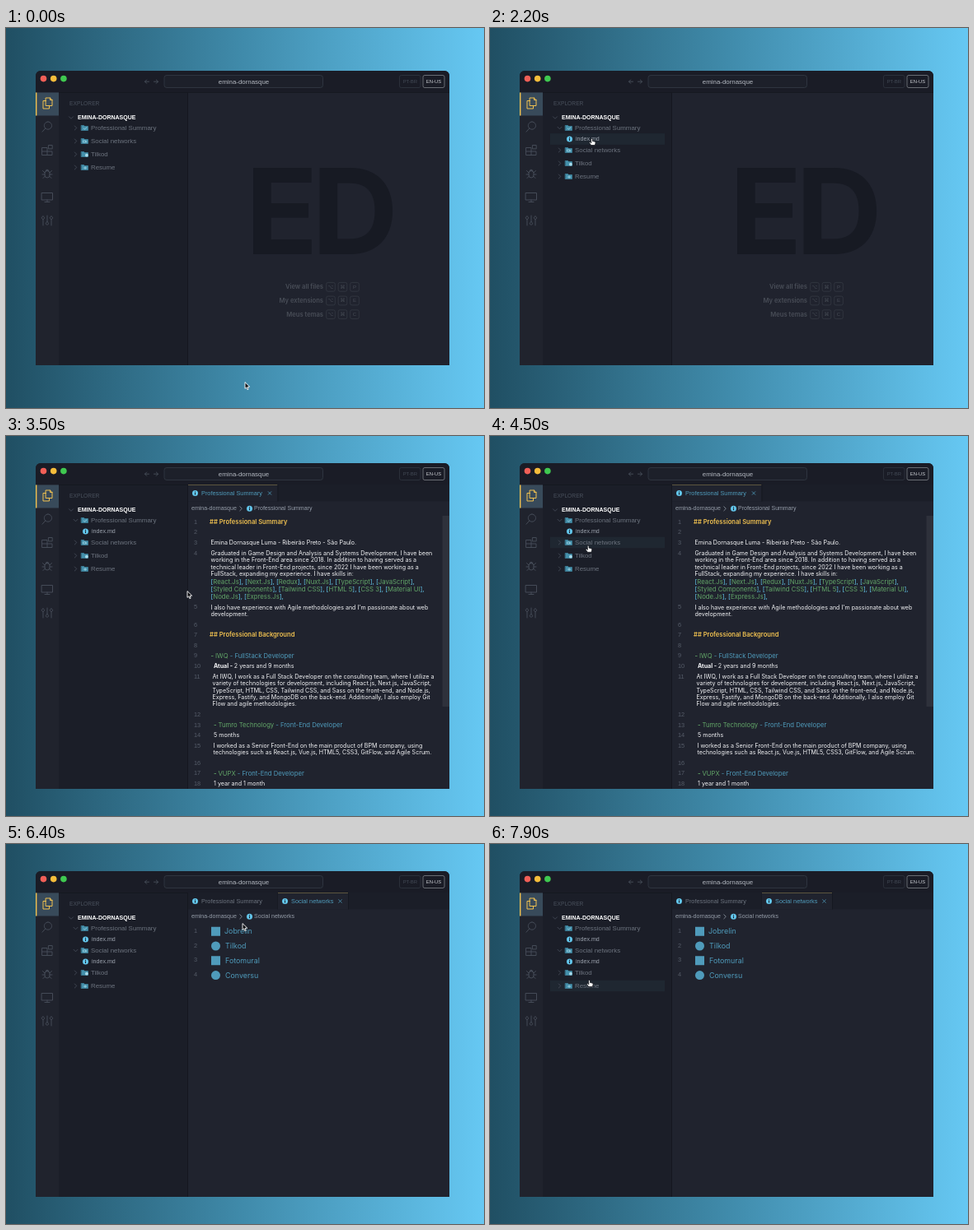
An HTML page with a canvas that plays this animation: 580 by 462 pixels, repeating every 8 s.

```html
<!DOCTYPE html>
<html lang="en">
<head>
<meta charset="utf-8">
<title>Code editor portfolio</title>
<style>
  html, body { margin: 0; width: 100%; height: 100%; overflow: hidden; background: #3f8cac; }
  canvas { display: block; width: 580px; height: 462px; }
</style>
</head>
<body>
<canvas id="stage"></canvas>
<script>
const W = 580, H = 462, LOOP = 8000, STEP = 100;
const canvas = document.getElementById('stage');
const ctx = canvas.getContext('2d');
const dpr = window.devicePixelRatio || 1;
canvas.width = W * dpr;
canvas.height = H * dpr;

const SANS = '"Liberation Sans", Arial, sans-serif';
const INTER = 'Inter, "Liberation Sans", sans-serif';
const SYMBOL = '"DejaVu Sans", sans-serif';
const C = {
  title: '#1a1c26', activity: '#20232d', side: '#1b1e28', editor: '#20232e', line: '#15171f',
  yellow: '#efc050', green: '#62a668', blue: '#4f9bbb', cyan: '#62c5ea', folder: '#4490ab',
  white: '#f4f5f7', dim: '#49505c', label: '#6c737e', hover: '#1f2731', logo: '#171a23'
};
const USER = 'emina-dornasque';

// Moments at which the interface changes
const AT = { firstFolder: 1800, firstTab: 2500, firstText: 2600, secondFolder: 4800, secondTab: 5300, links: 5500 };

// Pointer tip: time, x, y
const PATH = [
  [0, 290, 431], [100, 195, 215], [200, 90, 56], [300, 90, 56], [500, 102, 40], [900, 133, 117],
  [1300, 133, 117], [1500, 132, 119], [1900, 132, 119], [2200, 123, 135], [3100, 123, 135],
  [3500, 220, 189], [3700, 284, 235], [4000, 117, 157], [4600, 119, 129], [4800, 119, 129],
  [5100, 112, 143], [5800, 112, 143], [6100, 334, 112], [6200, 330, 85], [6400, 287, 97],
  [6600, 298, 103], [6700, 298, 103], [7100, 292, 145], [7600, 160, 168], [7700, 148, 168],
  [7900, 120, 166], [LOOP, 120, 166]
];

function pointerAt(t) {
  const i = Math.max(1, PATH.findIndex(p => p[0] >= t));
  const [t0, x0, y0] = PATH[i - 1], [t1, x1, y1] = PATH[i];
  const k = (t - t0) / (t1 - t0);
  return { x: x0 + (x1 - x0) * k, y: y0 + (y1 - y0) * k };
}

function text(s, x, y, size, color, { weight = 400, font = SANS, align = 'left' } = {}) {
  ctx.font = `${weight} ${size}px ${font}`;
  ctx.textAlign = align;
  ctx.textBaseline = 'middle';
  ctx.fillStyle = color;
  ctx.fillText(s, x, y);
  return ctx.measureText(s).width;
}

function runs(parts, x, y, size) {
  for (const [s, color, weight] of parts) x += text(s, x, y, size, color, { weight, font: INTER });
}

function rect(x, y, w, h, color) {
  ctx.fillStyle = color;
  ctx.fillRect(x, y, w, h);
}

function box(x, y, w, h, r, stroke, fill) {
  ctx.beginPath();
  ctx.roundRect(x, y, w, h, r);
  if (fill) { ctx.fillStyle = fill; ctx.fill(); }
  if (stroke) { ctx.strokeStyle = stroke; ctx.lineWidth = 0.8; ctx.stroke(); }
}

function disc(x, y, r, color) {
  ctx.beginPath();
  ctx.arc(x, y, r, 0, 7);
  ctx.fillStyle = color;
  ctx.fill();
}

function path(d, x, y, stroke, width = 0.9, fill) {
  ctx.save();
  ctx.translate(x, y);
  const p = new Path2D(d);
  if (fill) { ctx.fillStyle = fill; ctx.fill(p); }
  ctx.strokeStyle = stroke;
  ctx.lineWidth = width;
  ctx.lineJoin = ctx.lineCap = 'round';
  ctx.stroke(p);
  ctx.restore();
}

function chevron(x, y, open, color = C.dim) {
  path(open ? 'M-2.5-1.2L0 1.3L2.5-1.2' : 'M-1.2-2.5L1.3 0L-1.2 2.5', x, y, color, 0.8);
}

function info(x, y) {
  disc(x, y, 3.5, C.cyan);
  rect(x - 0.5, y - 0.6, 1, 2.6, C.side);
  rect(x - 0.5, y - 2.1, 1, 1, C.side);
}

function background() {
  const g = ctx.createLinearGradient(0, 0, W, 0);
  g.addColorStop(0, '#204f63');
  g.addColorStop(0.5, '#408bab');
  g.addColorStop(1, '#66c8f3');
  rect(0, 0, W, H, g);
}

function titleBar() {
  rect(36, 0, 502, 26, C.title);
  ['#f25f57', '#f6bd3b', '#3fc950'].forEach((c, i) => disc(45.5 + i * 12.2, 9.6, 3.8, c));
  path('M2.5 0H-2.5M-.3-2.2L-2.5 0L-.3 2.2', 171, 13.2, C.dim);
  path('M-2.5 0H2.5M.3-2.2L2.5 0L.3 2.2', 182, 13.2, C.dim);
  box(192, 5.5, 192.5, 15, 3, '#343a46', '#1d202a');
  text(USER, 288.5, 13.7, 7.9, '#b4b9c1', { align: 'center' });
  box(477.5, 5.5, 25.5, 15, 2, '#303641');
  text('PT-BR', 490.3, 13.5, 5.9, '#444b57', { align: 'center' });
  box(506, 5.5, 26, 15, 2, '#7d8187');
  text('EN-US', 519, 13.5, 5.9, '#c9ccd1', { align: 'center' });
}

const TOOLS = [
  [68, 'M1-6a4.6 4.6 0 1 1-.1 0M-2.2 2L-6 6.2'],
  [96.5, 'M-6-3H0V6H-6ZM-6 1.5H6V6H0M0 1.5M1.8-6H6.2V-1.6H1.8Z'],
  [125, 'M0-3.5A3 3 0 0 1 3-.5V2A3 3 0 0 1-3 2V-.5A3 3 0 0 1 0-3.5ZM-1.8-3A1.8 1.8 0 0 1 1.8-3M-3 1H-6M3 1H6M-3-1L-5.5-3.5M3-1L5.5-3.5M-2.5 3L-5 5.5M2.5 3L5 5.5'],
  [153.5, 'M-6.5-5H6.5V3.5H-6.5ZM0 3.5V6M-3 6H3'],
  [182, 'M-5-1.5V6M0-6V1.5M5-1.5V6M-5-5a1.7 1.7 0 1 1-.1 0M0 1.8a1.7 1.7 0 1 1-.1 0M5-5a1.7 1.7 0 1 1-.1 0']
];

function activityBar(height) {
  rect(36, 26, 28, height - 26, C.activity);
  rect(36, 26.5, 28, 28, '#384a5a');
  rect(36, 26.5, 1.4, 28, C.yellow);
  path('M-2-6.5H3L5.5-4V3H-2ZM3-6.5V-4H5.5M-2-3H-5.5V6.5H2V3', 50.5, 39.5, C.yellow, 1);
  for (const [y, d] of TOOLS) path(d, 50, y, C.dim);
}

function folder(x, y, badge) {
  path('M-4-3H-1L0-2H4V3H-4Z', x, y, C.folder, 0.6, C.folder);
  const mark = '#a9dbea';
  if (badge === 0) path('M-1.2.6L0 1.6L2.4-.6', x, y, mark, 0.8);
  else if (badge === 1) path('M-1.5-.6H1V1.6H-1.5ZM2.2 0V1.6', x, y, mark, 0.7);
  else if (badge === 2) disc(x + 2.4, y + 1.2, 1.9, mark);
  else path('M-1 .6H2.2M.6-.8V2', x, y, mark, 0.8);
}

// Rows of the file tree, y measured from the window's top
function treeRows(t) {
  const open = [t >= AT.firstFolder, t >= AT.secondFolder];
  const rows = [];
  let y = 69.5;
  ['Professional Summary', 'Social networks', 'Tilkod', 'Resume'].forEach((name, i) => {
    rows.push({ name, y, open: open[i], badge: i });
    if (open[i]) rows.push({ name: 'index.md', y: y + 13.5, file: true });
    y += open[i] ? 27 : 16;
  });
  return rows;
}

function sidebar(height, rows, hovered) {
  rect(64, 26, 156, height - 26, C.side);
  text('EXPLORER', 77, 40.5, 6.7, C.dim);
  chevron(79, 57, true);
  text(USER.toUpperCase(), 87, 57, 7, '#ffffff', { weight: 700 });
  for (const row of rows) {
    if (row === hovered) rect(73, row.y - 6.8, 139, 13.6, C.hover);
    if (row.file) {
      info(96.5, row.y);
      text(row.name, 104, row.y + 0.3, 7.1, '#9aa1ac');
    } else {
      chevron(84.5, row.y, row.open);
      folder(95.5, row.y, row.badge);
      text(row.name, 103, row.y + 0.3, 7.9, C.label);
    }
  }
}

function welcome() {
  ctx.font = `700 145px ${INTER}`;
  ctx.textAlign = 'left';
  ctx.textBaseline = 'alphabetic';
  ctx.fillStyle = C.logo;
  for (const [ch, left] of [['E', 299.5], ['D', 380]]) {
    ctx.fillText(ch, left + ctx.measureText(ch).actualBoundingBoxLeft, 223);
  }
  const keys = [['View all files', 'P'], ['My extensions', 'E'], ['Meus temas', 'C']];
  keys.forEach(([label, key], i) => {
    const y = 262.8 + i * 16.7;
    text(label, 385, y + 0.4, 7.6, '#484d57', { weight: 600, font: INTER, align: 'right' });
    ['⌥', '⌘', key].forEach((k, j) => {
      const x = 394 + j * 14.5;
      box(x - 5.3, y - 5.4, 10.6, 10.8, 2, '#353a44');
      text(k, x, y + 0.3, 6, '#484d57', { font: j < 2 ? SYMBOL : SANS, align: 'center' });
    });
  });
}

function tab(x, w, label, active) {
  if (active) {
    rect(x, 26, w, 20.5, C.editor);
    rect(x, 26, w, 0.7, '#786c45');
    path('M-1.8-1.8L1.8 1.8M1.8-1.8L-1.8 1.8', x + w - 9.5, 36.5, C.blue, 0.8);
  }
  rect(x + w, 26, 0.8, 20.5, C.line);
  info(x + 8.5, 36.5);
  text(label, x + 16, 36.8, 7.35, active ? C.blue : C.label);
}

function tabs(second) {
  rect(221, 26, 317, 20.5, C.side);
  tab(221, 108.5, 'Professional Summary', !second);
  if (second) tab(330, 85, 'Social networks', true);
  text(USER, 225, 55.4, 7.05, '#949ca8');
  chevron(285, 55.3, false, '#949ca8');
  info(295.5, 55.2);
  text(second ? 'Social networks' : 'Professional Summary', 301, 55.4, 7, '#949ca8');
}

function tags(list) {
  return list.split(',').flatMap(s => [['[', C.cyan], [s, C.green], ['], ', C.cyan]]);
}

function job(company, role) {
  return [['- ', C.green, 600], [company + ' ', C.green], ['- ' + role, C.blue]];
}

const plain = s => [[s, C.white]];
const heading = s => [['## ' + s, C.yellow, 600]];
// Each block: left edge, font size, then its lines
const DOC = [
  [247, 7.6, heading('Professional Summary')],
  [],
  [248.5, 7.1, plain('Emina Dornasque Luma - Ribeirão Preto - São Paulo.')],
  [248.5, 7.1,
    plain('Graduated in Game Design and Analysis and Systems Development, I have been'),
    plain('working in the Front-End area since 2018. In addition to having served as a'),
    plain('technical leader in Front-End projects, since 2022 I have been working as a'),
    plain('FullStack, expanding my experience. I have skills in:'),
    tags('React.Js,Next.Js,Redux,Nuxt.Js,TypeScript,JavaScript'),
    tags('Styled Components,Tailwind CSS,HTML 5,CSS 3,Material UI'),
    tags('Node.Js,Express.Js')],
  [248.5, 7.1,
    plain("I also have experience with Agile methodologies and I'm passionate about web"),
    plain('development.')],
  [],
  [247, 7.6, heading('Professional Background')],
  [],
  [248.5, 7.7, job('IWQ', 'FullStack Developer')],
  [252, 7.1, [['Atual - ', C.white, 700], ['2 years and 9 months', C.white]]],
  [250.5, 7.1,
    plain('At IWQ, I work as a Full Stack Developer on the consulting team, where I utilize a'),
    plain('variety of technologies for development, including React.js, Next.js, JavaScript,'),
    plain('TypeScript, HTML, CSS, Tailwind CSS, and Sass on the front-end, and Node.js,'),
    plain('Express, Fastify, and MongoDB on the back-end. Additionally, I also employ Git'),
    plain('Flow and agile methodologies.')],
  [],
  [252, 7.7, job('Tumro Technology', 'Front-End Developer')],
  [252, 7.1, plain('5 months')],
  [251.5, 7.1,
    plain('I worked as a Senior Front-End on the main product of BPM company, using'),
    plain('technologies such as React.js, Vue.js, HTML5, CSS3, GitFlow, and Agile Scrum.')],
  [],
  [252, 7.7, job('VUPX', 'Front-End Developer')],
  [252, 7.1, plain('1 year and 1 month')]
];

function lineNumber(n, y) {
  text(n, 228, y, 7.4, '#555c68');
}

function summary() {
  let y = 71.8;
  DOC.forEach(([x, size, ...lines], i) => {
    lineNumber(i + 1, y);
    lines.forEach((line, j) => {
      const isTags = line[0][0] === '[';
      if (j) y += isTags ? 9.3 : 8.45;
      runs(line, x, y, isTags ? 7.75 : size);
    });
    y += 12.6;
  });
  rect(529.5, 64, 8.5, 232, '#2e313b');
}

const LINKS = ['Jobrelin', 'Tilkod', 'Fotomural', 'Conversu'];

function links() {
  LINKS.forEach((name, i) => {
    const y = 73.2 + i * 17.8;
    lineNumber(i + 1, y - 0.5);
    if (i % 2) disc(254.5, y, 5.5, C.blue);
    else box(249, y - 5.5, 11, 11, 0, null, C.blue);
    text(name, i ? 266 : 265, y + 0.3, 8.9, C.blue, { font: INTER });
  });
}

function pointer({ x, y }, hand) {
  if (hand) {
    path('M-.9.9Q0-.5.9.9V3.2L3.6 3.9Q4.8 4.3 4.6 5.5L3.9 8.4H-.7L-3 5.4Q-3.2 4.2-1.8 4.6L-.9 5.3Z', x + 0.5, y - 0.8, '#15171d', 0.8, '#fff');
  } else {
    path('M0 0V7.4L1.7 5.9L2.9 8.7L4.2 8.1L3 5.4L5.3 5.2Z', x, y, '#fff', 0.9, '#0b0c0f');
  }
}

function draw(t) {
  const opened = t >= AT.firstTab;
  const top = opened ? 33 : 52, height = opened ? 396 : 358;
  const tip = pointerAt(Math.floor(t / STEP) * STEP);
  const rows = treeRows(t);
  const ry = tip.y - top;
  const hovered = tip.x > 73 && tip.x < 212 ? rows.find(r => Math.abs(r.y - ry) < 6.9) : null;
  const onLink = t >= AT.links && tip.x > 248 && tip.x < 309 && ry > 67 && ry < 132;

  ctx.setTransform(dpr, 0, 0, dpr, 0, 0);
  background();
  ctx.save();
  ctx.translate(0, top);
  ctx.beginPath();
  ctx.roundRect(36, 0, 502, height, [6, 6, 0, 0]);
  ctx.clip();
  rect(36, 0, 502, height, C.editor);
  titleBar();
  activityBar(height);
  sidebar(height, rows, hovered);
  rect(64, 26, 474, 0.8, C.line);
  rect(220, 26, 1, height - 26, C.line);
  if (!opened) welcome();
  else {
    tabs(t >= AT.secondTab);
    if (t >= AT.links) links();
    else if (t >= AT.firstText) summary();
    else lineNumber(1, 71.8);
  }
  ctx.restore();
  pointer(tip, hovered || onLink);
}

function frame() {
  draw(performance.now() % LOOP);
  requestAnimationFrame(frame);
}
frame();
</script>
</body>
</html>
```
